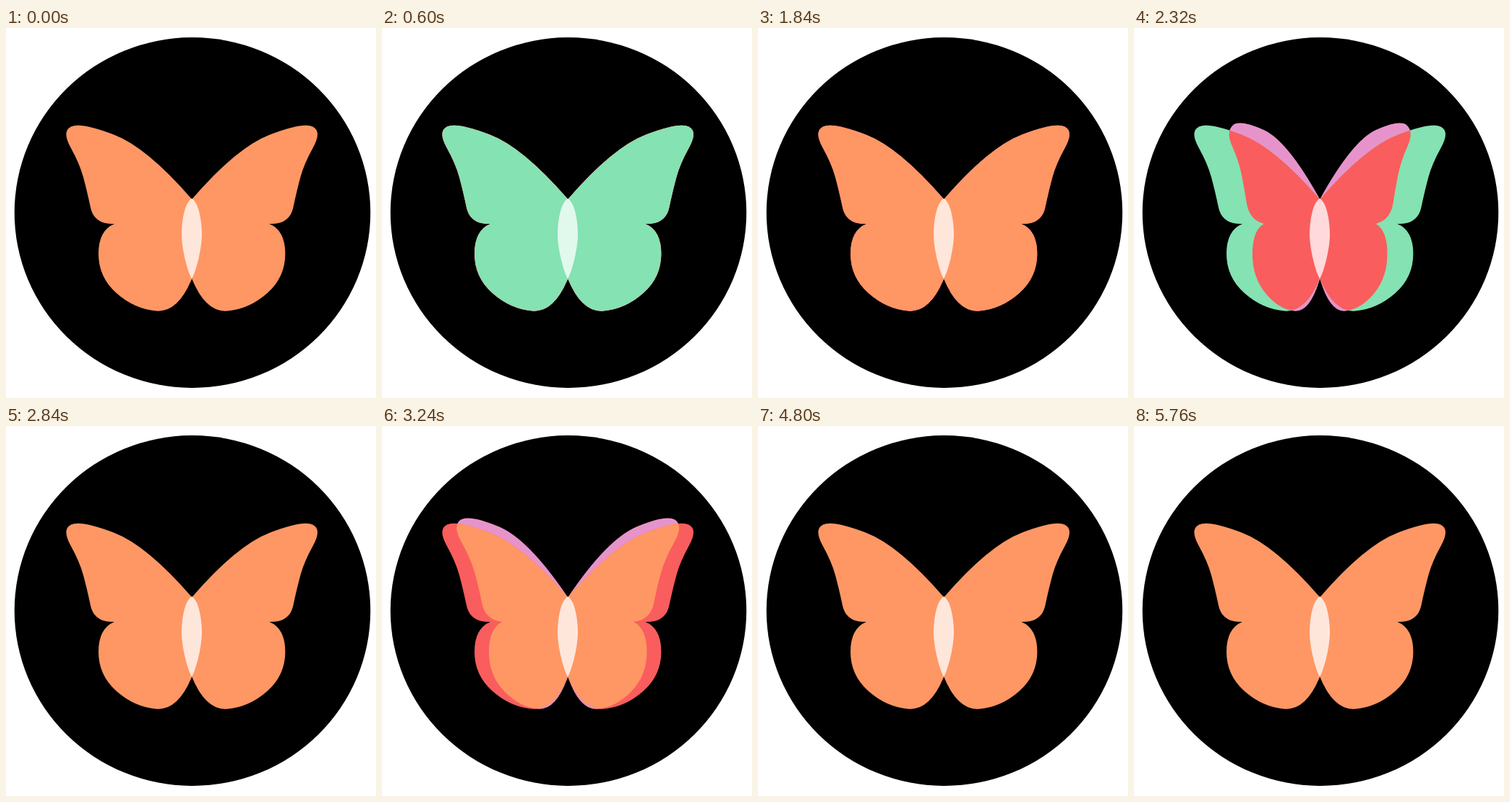
These frames come from a looping animation (512 px wide and 512 px high, 5.8 s). An HTML page:

```html
<!DOCTYPE html>
<html lang="en">
<head>
<meta charset="utf-8">
<title>Butterfly</title>
<style>
html, body { margin: 0; width: 100%; height: 100%; overflow: hidden; background: #fff; }
svg { display: block; width: 100vw; height: 100vh; }
</style>
</head>
<body>
<svg viewBox="0 0 512 512">
  <defs><clipPath id="spread"><path id="clip"/></clipPath></defs>
  <ellipse cx="258" cy="255.5" rx="246.3" ry="242.5"/>
  <path id="edge" fill="#e793cb"/>
  <path id="base"/>
  <path id="front" clip-path="url(#spread)"/>
  <path id="body" d="M257 236C267 242 271 267 271 286S263 337 257 347C251 337 243 305 243 286S247 242 257 236Z"/>
</svg>
<script>
const LOOP = 5800, STEP = 40, CYCLE = 720;
const OPENING = 120, CLOSING = 72;
const STARTS = [5, 283, 480];
const COLORS = [
  { wing: '#fe9764', body: '#ffe6db' },
  { wing: '#85e2b2', body: '#e1f8ed' },
  { wing: '#fa5d5d', body: '#ffd9db' }
];

// Left wing: corner points, and the control points between them.
const AXIS = 257.2, SPAN = 174, SHOULDER = 237;
const ROOT = [AXIS, SHOULDER], NOTCH = [150, 271], TAIL = [AXIS, 347];
const UPPER = [[195, 165], [103, 130], [77, 143], [102, 188], [112, 225], [122, 272]];
const LOWER = [[128, 280], [128, 345], [178, 389], [238, 394]];

const byId = id => document.getElementById(id);
const edge = byId('edge'), base = byId('base'), front = byId('front'), body = byId('body');

// Quadratic curve that joins its pieces halfway between control points.
function arc(controls, end) {
  return controls.map((p, i) => {
    const next = controls[i + 1];
    const to = next ? p.map((v, k) => (v + next[k]) / 2) : end;
    return `Q${p} ${to}`;
  }).join('');
}

function butterfly(open, rising) {
  const fold = 1 - open;
  const lift = 74 * fold ** (rising ? 1.35 : 4);

  const half = side => {
    const narrow = ([x, y]) => [AXIS - side * (AXIS - x) * open, y];
    const raise = ([x, y]) => {
      const up = Math.max(0, (SHOULDER - y) / 104);
      const reach = open + (rising ? 0.35 * up * open * fold : 0);
      const bow = 36 * fold * Math.sin(Math.PI * (AXIS - x) / SPAN);
      return [AXIS - side * (AXIS - x) * reach, y - lift * up - bow];
    };
    return `M${ROOT}${arc(UPPER.map(raise), narrow(NOTCH))}${arc(LOWER.map(narrow), TAIL)}Z`;
  };
  return half(1) + half(-1);
}

function openness(age) {
  const offset = age - OPENING;
  const turn = offset / (offset < 0 ? OPENING : CLOSING);
  return turn < 1 ? Math.cos(turn * Math.PI / 2) : 0;
}

const spread = butterfly(1, false);
base.setAttribute('d', spread);
byId('clip').setAttribute('d', spread);

function draw(time) {
  const now = Math.floor(time / STEP) * STEP;
  const ages = STARTS.map(start => (now - start + CYCLE) % CYCLE);
  const age = Math.min(...ages);
  const flap = ages.indexOf(age);
  const under = COLORS[(flap + 1) % 3], over = COLORS[(flap + 2) % 3];
  const open = openness(age);
  const shape = open > 0.01 ? butterfly(open, age < OPENING) : '';

  edge.setAttribute('d', shape);
  front.setAttribute('d', shape);
  base.setAttribute('fill', under.wing);
  front.setAttribute('fill', over.wing);
  body.setAttribute('fill', (open > 0.3 ? over : under).body);
}

const began = performance.now();
function tick() {
  draw((performance.now() - began) % LOOP);
  requestAnimationFrame(tick);
}
tick();
</script>
</body>
</html>
```
